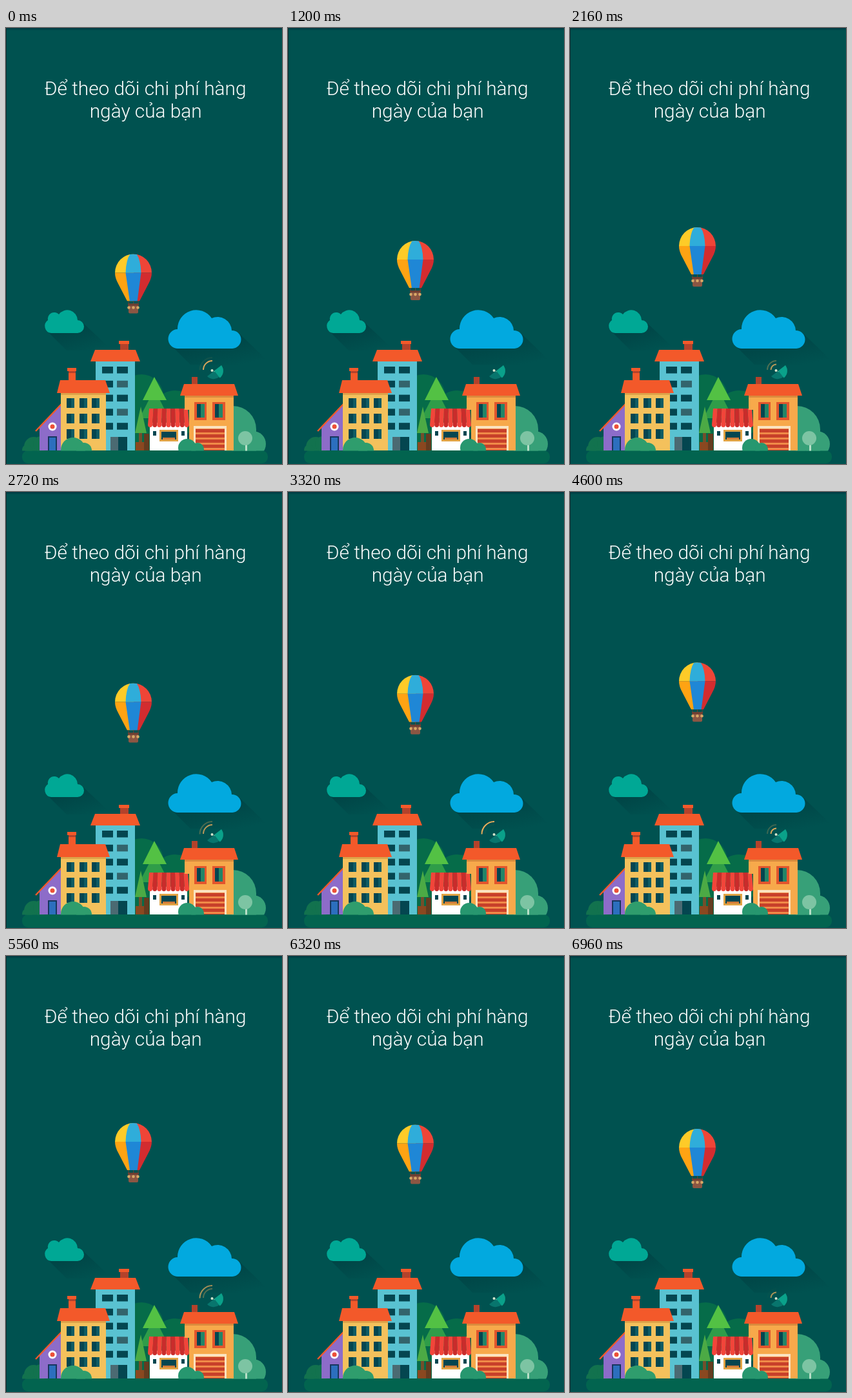
An HTML page that plays this animation: 428 px wide and 676 px high, repeating every 7 s.

```html
<!DOCTYPE html>
<html lang="vi">
<head>
<meta charset="utf-8">
<style>
html, body { margin: 0; width: 100%; height: 100%; overflow: hidden; background: #005250; }
svg { display: block; width: 100%; height: 100%; }
text { font: 300 29.8px Roboto, sans-serif; fill: #fff; text-anchor: middle; }
.roof { fill: #f3592a; }
.brick { fill: #b4422b; }
.dark { fill: #044650; }
.bush { fill: #2f9d6d; }
.wave { fill: none; stroke: #efad5b; stroke-width: 2; }
</style>
</head>
<body>
<svg viewBox="0 0 428 676">
  <defs>
    <linearGradient id="shade" x2=".7" y2="1">
      <stop offset=".3" stop-color="#003d40" stop-opacity=".65"/>
      <stop offset="1" stop-color="#003d40" stop-opacity="0"/>
    </linearGradient>
    <linearGradient id="top" x2="0" y2="1">
      <stop stop-color="#003640"/>
      <stop offset="1" stop-color="#005250"/>
    </linearGradient>
    <clipPath id="envelope">
      <path d="M169 380A28.5 29 0 0 1 226 380Q226 388 221 397L207 424H188L174 397Q169 388 169 380Z"/>
    </clipPath>
    <clipPath id="aboveGround"><path d="M0 0H428V655.500H0Z"/></clipPath>
    <pattern id="slats" width="49" height="8" y="622" patternUnits="userSpaceOnUse">
      <path fill="#f08a48" d="M0 0H49V8H0Z"/><path fill="#c8402a" d="M0 0H49V5H0Z"/>
    </pattern>
  </defs>

  <path fill="#005250" d="M0 0H428V676H0Z"/>
  <path fill="url(#top)" d="M0 0H428V4H0Z"/>
  <path fill="#062c30" d="M0 0H1V676H0Z"/>
  <text x="216" y="104">Để theo dõi chi phí hàng</text>
  <text x="216.700" y="139">ngày của bạn</text>

  <!-- clouds -->
  <path fill="url(#shade)" d="M63 469L118 456L165 500H94Z"/>
  <path fill="url(#shade)" d="M257 493L361 473L412 522H286Z"/>
  <path fill="#00a895" d="M70 473A11 11 0 0 1 65 453A10 10 0 0 1 82 444A16 16 0 0 1 111 453A10 10 0 0 1 111 473Z"/>
  <path fill="#02a9df" d="M267 497A15 15 0 0 1 266 467A29 29 0 0 1 319 450A22 22 0 0 1 350 469A14 14 0 0 1 351 497Z"/>

  <!-- greenery behind the houses -->
  <rect x="25" y="655" width="381" height="20" rx="9" fill="#02644f"/>
  <g clip-path="url(#aboveGround)">
    <g fill="#066c49">
      <circle cx="210" cy="571" r="34"/><circle cx="262" cy="598" r="36"/>
      <path d="M195 575H280V656H195Z"/>
    </g>
    <g fill="#12724e">
      <circle cx="43" cy="649" r="15"/><circle cx="33" cy="654" r="8"/><circle cx="54" cy="645" r="12"/>
    </g>
    <g fill="#37a078">
      <circle cx="352" cy="622" r="36"/><circle cx="383" cy="645" r="20"/>
      <path d="M350 622H388V656H350Z"/>
    </g>
    <path fill="#b9dfc8" d="M371 636H374V656H371Z"/>
    <circle cx="371" cy="636" r="11" fill="#7dc4a3"/>
  </g>
  <path fill="#72502c" d="M227 600H234V655H227ZM206 625H211V655H206Z"/>
  <path fill="#2f9d49" d="M230 560L253 605H207Z"/>
  <path fill="#53c144" d="M230 541L249 577H212Z"/>
  <path fill="#4caa45" d="M209 587L218 628H200Z"/>
  <path fill="#8a4820" d="M201 642H215V655H201Z"/>
  <path fill="#643c20" d="M214 629H222V655H214Z"/>

  <!-- tower -->
  <path fill="#59c2d1" d="M139 516H200V655H139Z"/>
  <path class="brick" d="M177 490H190V499H177Z"/>
  <path class="roof" d="M175 485H191V490H175ZM138 499H201L208 517H131Z"/>
  <g id="towerWindows"></g>
  <path fill="#4b6a72" d="M162 634H188V655H162Z"/>
  <path class="dark" d="M174 634H188V655H174Z"/>

  <!-- small gabled house -->
  <path fill="#8d6cc9" d="M52 619L86 583V655H52Z"/>
  <path fill="none" stroke="#f3592a" stroke-width="2.500" d="M46 625L86 583"/>
  <circle cx="72" cy="618" r="6.500" fill="#fff"/><circle cx="72" cy="618" r="3.500" fill="#ec5038"/>
  <path fill="#17365e" d="M65 633H79V655H65Z"/><path fill="#2c6fbe" d="M67 635H77V655H67Z"/>

  <!-- yellow house -->
  <path fill="#f4c15c" d="M85 565H155V655H85Z"/>
  <path fill="#dda34a" d="M85 566H155V569H85Z"/>
  <path class="roof" d="M95 527H109V532H95ZM97 532H108V547H97ZM84 546H154L161 566H79Z"/>
  <path class="brick" d="M97 532H108V535H97Z"/>
  <g id="houseWindows"></g>

  <!-- shop -->
  <path fill="#fff" d="M223 612H281V655H223Z"/>
  <g id="awning"></g>
  <path fill="#e1a344" d="M238 623H267V641H238Z"/>
  <path class="dark" d="M241 626H264V638H241ZM228 625H233V632H228ZM272 625H277V632H272Z"/>
  <path fill="#d07b38" d="M243 635H262V638H243Z"/>

  <!-- orange house -->
  <path fill="#f7a94b" d="M284 570H353V655H284ZM277 570H286V592H277Z"/>
  <path fill="#db8a3d" d="M277 570H353V573H277Z"/>
  <path class="brick" d="M288 541H297V553H288Z"/>
  <path class="roof" d="M276 552H354L360 570H270Z"/>
  <path fill="#e2552d" d="M292 580H311V608H292ZM320 580H340V608H320Z"/>
  <path class="dark" d="M296 583H308V604H296ZM324 583H336V604H324Z"/>
  <path fill="#238568" d="M302 583H308V604H302ZM330 583H336V604H330Z"/>
  <path fill="#fbe3c0" d="M291 617H342V655H291Z"/>
  <path fill="url(#slats)" d="M294 621H339V655H294Z"/>

  <!-- front bushes -->
  <g class="bush" clip-path="url(#aboveGround)">
    <circle cx="104" cy="654" r="19"/><circle cx="121" cy="655" r="12"/>
    <g fill="#27976f"><circle cx="281" cy="651" r="14"/><circle cx="297" cy="653" r="10"/></g>
  </g>

  <!-- dish -->
  <path fill="#08756d" d="M312 540L334 523A14 14 0 0 1 312 540Z"/>
  <path fill="#0aa18a" d="M323 531.500L334 523A14 14 0 0 1 331.600 542.600Z"/>
  <path stroke="#63a993" d="M319.500 531L324 533"/>
  <circle cx="319.500" cy="531" r="2" fill="#d6e6cd"/>
  <path class="wave" d="M311.500 530A8.500 8.500 0 0 1 320 521.500"/>
  <path class="wave" d="M306 530A14 14 0 0 1 320 516"/>
  <path class="wave" d="M300.500 530.500A19.500 19.500 0 0 1 320 511"/>

  <g id="balloon">
    <g clip-path="url(#envelope)">
      <path fill="#fecb28" d="M165 350H198V380H165Z"/>
      <path fill="#ef4537" d="M198 350H230V380H198Z"/>
      <path fill="#ffa313" d="M165 380H198V425H165Z"/>
      <path fill="#d32c2f" d="M198 380H230V425H198Z"/>
      <path fill="#2fadda" d="M185.500 380Q186 360 193 350H202Q209 360 209.500 380Z"/>
      <path fill="#1f87d6" d="M185.500 380H209.500L203.500 425H192Z"/>
    </g>
    <path stroke="#713f32" d="M190 424V430M205 424V430M197.500 424V430"/>
    <path fill="#8c5643" d="M190 428H205V441Q205 443 203 443H192Q190 443 190 441Z"/>
    <path fill="#6e3e31" d="M189 428H206V431H189Z"/>
    <g fill="#d8a866"><circle cx="190.500" cy="434" r="2.300"/><circle cx="197.500" cy="434" r="2.300"/><circle cx="204.500" cy="434" r="2.300"/></g>
  </g>
</svg>
<script>
const $ = id => document.getElementById(id);
const rect = (x, y, w, h, fill) => `<rect x="${x}" y="${y}" width="${w}" height="${h}" fill="${fill}"/>`;

let tower = '', house = '', awning = '';
for (let row = 0; row < 5; row++) {
  const y = 525 + row * 21.8;
  tower += rect(149, y, 17, 10.5, '#044650') + rect(172, y, 17, 10.5, row % 2 ? '#33646c' : '#044650');
}
for (const y of [574, 598, 622])
  for (const x of [94, 114, 133])
    house += rect(x, y, 12, 15, '#044650') + rect(x + 7, y, 5, 15, '#0f5c64');
for (let i = 0; i < 9; i++) {
  const x = 220 + i * 7.11, fill = i % 2 ? '#c92c2b' : '#f2453a';
  awning += `<path fill="${fill}" d="M${222 + i * 6.67} 590h6.67L${x + 7.11} 615a3.55 4 0 0 1-7.11 0Z"/>`;
}
$('towerWindows').innerHTML = tower;
$('houseWindows').innerHTML = house;
$('awning').innerHTML = awning;

const LOOP = 7000, STEP = 40, PULSE = 2500;
const waves = document.querySelectorAll('.wave');
// start, peak and end of each wave within the pulse cycle
const times = [[1650, 2080, 2450], [1950, 2550, 3350], [2430, 3330, 3650]];

const ramp = (t, [start, peak, end]) =>
  Math.max(0, Math.min((t - start) / (peak - start), (end - t) / (end - peak)));

function draw(now) {
  const t = Math.floor(now % LOOP / STEP) * STEP;
  const rise = -42 - 50 * Math.sin((t - 2160) * 0.000454);
  $('balloon').setAttribute('transform', `translate(0 ${rise.toFixed(2)})`);
  const phase = t % PULSE;
  waves.forEach((wave, i) => {
    wave.style.opacity = Math.max(ramp(phase, times[i]), ramp(phase + PULSE, times[i]));
  });
  requestAnimationFrame(draw);
}
draw(performance.now());
</script>
</body>
</html>
```
